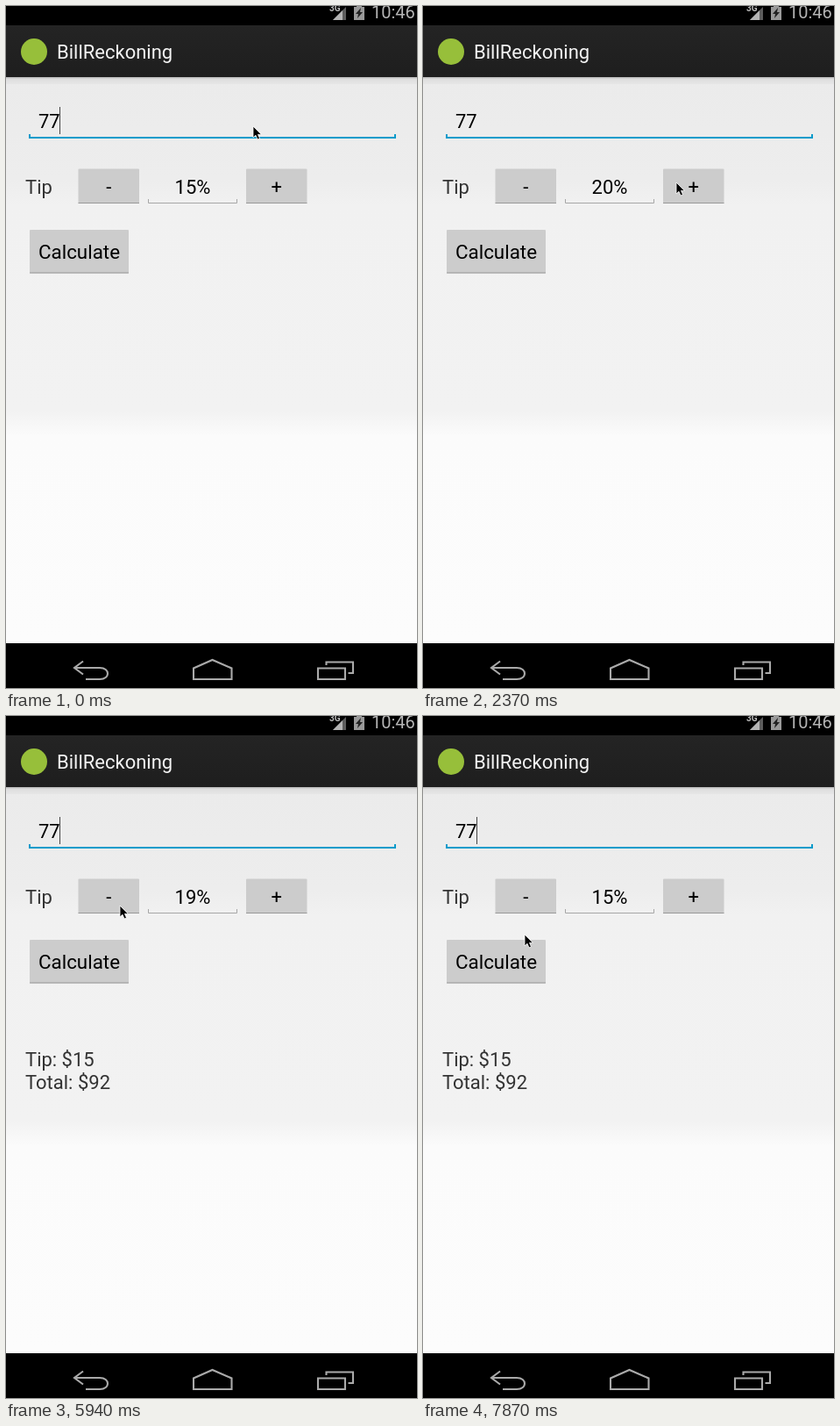
Animation of 469 by 777 pixels, one loop 8 s. Source, as an HTML page:

```html
<!DOCTYPE html>
<html lang="en">
<head>
<meta charset="utf-8">
<title>Tip screen</title>
<style>
  html, body { margin: 0; width: 100%; height: 100%; overflow: hidden; background: #000; }
  svg { display: block; width: 469px; height: 777px; font: 22px Roboto, sans-serif; }
  .mid { text-anchor: middle; }
  .soft { fill: #333; }
  .nav { fill: none; stroke: #aaa; stroke-width: 2.1; }
</style>
</head>
<body>
<svg viewBox="0 0 469 777">
  <defs>
    <linearGradient id="page" gradientUnits="userSpaceOnUse" x1="0" y1="82" x2="0" y2="725">
      <stop offset="0" stop-color="#ebebeb"/>
      <stop offset=".18" stop-color="#ededed"/>
      <stop offset=".225" stop-color="#f1f1f1"/>
      <stop offset=".59" stop-color="#f2f2f2"/>
      <stop offset=".635" stop-color="#fbfbfb"/>
      <stop offset="1" stop-color="#fcfcfc"/>
    </linearGradient>
    <linearGradient id="bar" x2="0" y2="1">
      <stop offset="0" stop-color="#242424"/>
      <stop offset="1" stop-color="#1e1e1e"/>
    </linearGradient>
    <linearGradient id="shade" x2="0" y2="1">
      <stop offset="0" stop-color="#b8b8b8"/>
      <stop offset=".3" stop-color="#dedede"/>
      <stop offset="1" stop-color="#e6e6e6"/>
    </linearGradient>
  </defs>

  <!-- Status bar -->
  <rect width="469" height="777"/>
  <text x="417" y="14" font-size="20" fill="#b4b4b4">10:46</text>
  <text x="369" y="6" font-size="10" font-weight="700" fill="#bbb">3G</text>
  <path d="M373 16L388 1V16Z" fill="#5c5c5c"/>
  <path d="M373 16L384 5V16Z" fill="#b4b4b4"/>
  <path d="M397 1H400V0H406V1H409V16H397Z" fill="#999"/>
  <path d="M405 2L399 9H402L401 14L407 7H404Z" fill="#222"/>

  <!-- Action bar -->
  <rect y="22" width="469" height="59" fill="url(#bar)"/>
  <circle cx="32" cy="52" r="15" fill="#97bf3a"/>
  <text x="58" y="60" fill="#f3f3f3">BillReckoning</text>

  <!-- Page -->
  <rect y="81" width="469" height="645" fill="url(#page)"/>
  <rect y="81" width="469" height="8" fill="url(#shade)"/>
  <path d="M26 146H28V149H443V146H445V151H26Z" fill="#0a9bcb"/>
  <text x="37" y="139">77</text>
  <rect id="caret" x="61" y="115" width="1" height="31" fill="#444"/>

  <text class="soft" x="22" y="214">Tip</text>
  <path d="M162.5 220V224.5H263.5V220" fill="none" stroke="#a6a6a6"/>
  <text id="percent" class="mid" x="213" y="214"></text>
  <g id="buttons"></g>
  <g id="result" class="soft">
    <text x="22" y="399">Tip: $15</text>
    <text x="22" y="425">Total: $92</text>
  </g>

  <!-- Navigation bar -->
  <g class="nav">
    <path d="M88 746.5L78 754L88 761.5M78 754H107C119 754 119 767 107 767H91"/>
    <path d="M214 767V754.5L235.5 745L257.5 754.5V767Z"/>
    <path d="M356 754.5H387V767H356ZM365.5 751V747.5H396V760H390.5"/>
  </g>

  <path id="cursor" d="M0 0V13L3 10.3L5 15L7.5 14L5.5 9.4H9.5Z" stroke="#fff" stroke-width=".8"/>
</svg>
<script>
const LOOP = 8000;
const STEP = 148.5;       // the screen refreshes once per step
const BLINK = 3.36;       // steps between caret flips
const CLICK_GAP = 2.3;    // steps between clicks
const CLICKS = 5;
const el = id => document.getElementById(id);

function addButton(id, x, y, w, h, label, baseline, size = 22) {
  el('buttons').insertAdjacentHTML('beforeend', `
    <rect id="${id}" x="${x}" y="${y}" width="${w}" height="${h}" rx="1" fill="#ccc"/>
    <rect x="${x}" y="${y + h - 1}" width="${w}" height="1" fill="#999"/>
    <text class="mid" x="${x + w / 2}" y="${baseline}" font-size="${size}">${label}</text>`);
}
addButton('minus', 82.5, 185.5, 69.5, 39.5, '-', 214);
addButton('plus', 274, 185.5, 69.5, 39.5, '+', 214);
addButton('calculate', 27, 255, 113, 49.5, 'Calculate', 288, 22.4);

// Each glide leaves from where the previous one ended.
const origin = { x: 282, y: 137 };
const glides = [
  { from: 1, to: 5, x: 289, y: 201 },
  { from: 21, to: 27, x: 102, y: 278 },
  { from: 35, to: 39, x: 130, y: 216 },
  { from: 52, to: 53, x: 116, y: 249 }
];

const clamp = (v, low, high) => Math.min(high, Math.max(low, v));
const clicks = (step, start) => clamp(Math.floor((step - start) / CLICK_GAP) + 1, 0, CLICKS);
const show = (id, on) => el(id).setAttribute('visibility', on ? 'visible' : 'hidden');
const press = (id, on) => el(id).setAttribute('fill', on ? '#8ccbe2' : '#ccc');

function cursorAt(step) {
  let { x, y } = origin;
  for (const glide of glides) {
    const p = clamp((step - glide.from) / (glide.to - glide.from), 0, 1);
    const eased = 1 - (1 - p) ** 2;
    x += (glide.x - x) * eased;
    y += (glide.y - y) * eased;
  }
  return [Math.round(x), Math.round(y)];
}

function draw(t) {
  const step = Math.floor(t / STEP + 0.06);
  el('cursor').setAttribute('transform', `translate(${cursorAt(step)})`);
  el('percent').textContent = `${15 + clicks(step, 6.05) - clicks(step, 39.3)}%`;
  show('caret', Math.floor((step - 1.3) / BLINK) % 2 !== 0);
  show('result', step >= 30);
  press('plus', step === 10);
  press('minus', step === 46);
}

const start = performance.now();
function tick() {
  draw((performance.now() - start) % LOOP);
  requestAnimationFrame(tick);
}
tick();
</script>
</body>
</html>
```
